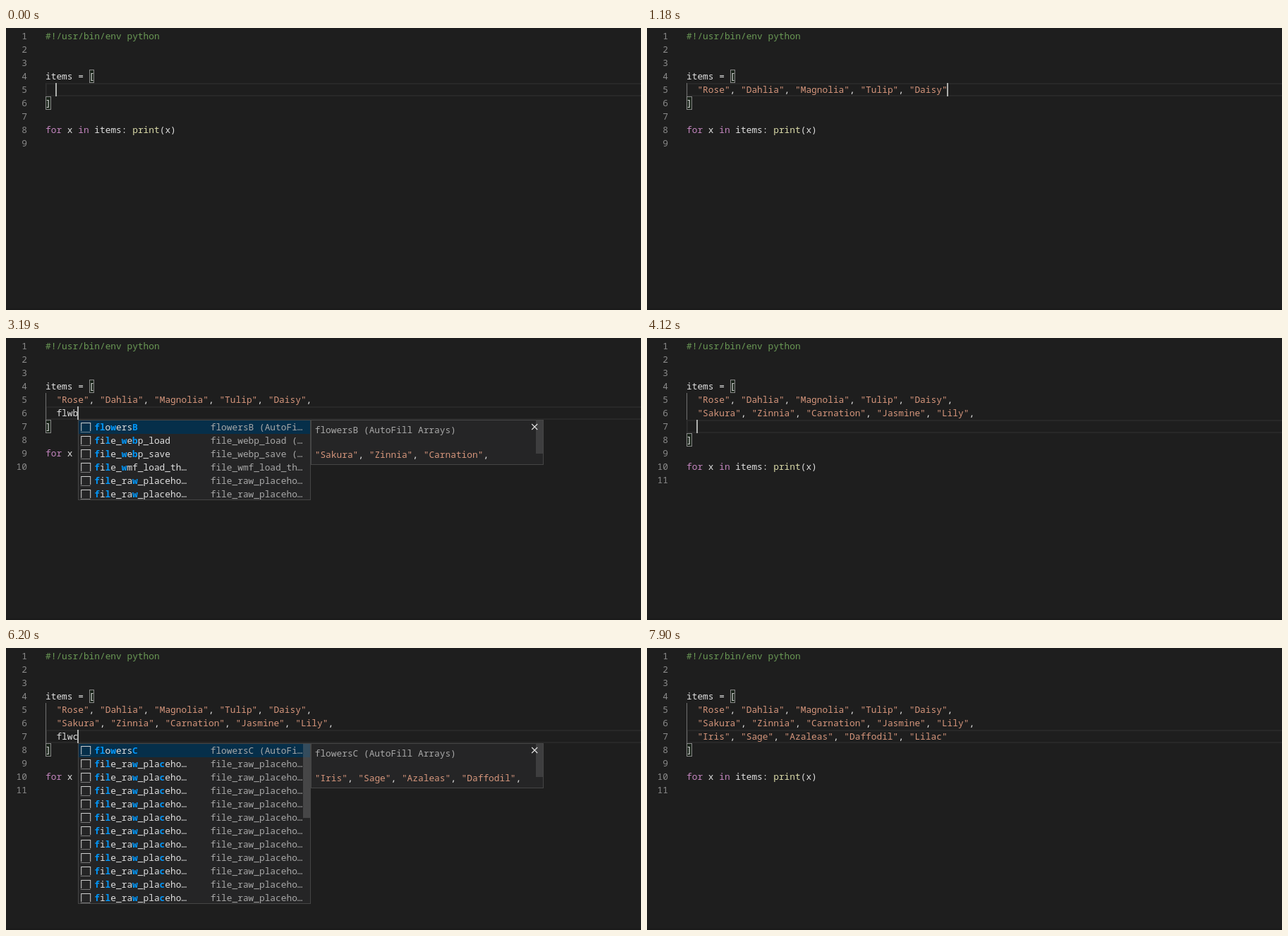
Animation, 900 px wide and 400 px high, one loop 8000 ms. Source, as an HTML page with a canvas:

```html
<!DOCTYPE html>
<html lang="en">
<head>
<meta charset="utf-8">
<title>Snippet completion</title>
<style>
html, body { margin: 0; width: 100%; height: 100%; overflow: hidden; background: #1e1e1e; }
canvas { display: block; width: 900px; height: 400px; }
</style>
</head>
<body>
<canvas id="stage" width="900" height="400"></canvas>
<script>
const ctx = document.getElementById("stage").getContext("2d");
const LOOP = 8000, CH = 7.7, LH = 19, LEFT = 56, TOP = 2;
const WIDTH = 330, MAX_ROWS = 12, MAX_CHARS = 17;
const FONT = '12.83px "Noto Sans Mono", "DejaVu Sans Mono", monospace';
const C = {
  bg: "#1e1e1e", text: "#e0e0e0", num: "#8a8a8a", comment: "#6a9955",
  string: "#d6967c", keyword: "#c586c0", call: "#dcdcaa", panel: "#252526",
  border: "#454545", selected: "#062f4a", match: "#0097fb", dim: "#a8a8a8",
  slider: "rgba(121,121,121,.4)", docSlider: "rgba(121,121,121,.3)",
  line: "#282828", caret: "#aeafad", icon: "#d0d0d0"
};

const quote = words => words.split(" ").map(w => `"${w}"`).join(", ");
const ROWS = [
  "Rose Dahlia Magnolia Tulip Daisy",
  "Sakura Zinnia Carnation Jasmine Lily",
  "Iris Sage Azaleas Daffodil Lilac"
].map(quote);
const DOCS = {
  A: quote("Rose Dahlia Magnolia Tulip") + ",",
  B: quote("Sakura Zinnia Carnation") + ",",
  C: quote("Iris Sage Azaleas Daffodil") + ","
};
const RECENT = "CAB";   // remembered choice on each row

const list = s => s.split(" ");
const flowers = list("flowersA flowersB flowersC flowersD flowersE");
const files = list("file_webp_load file_webp_save file_wmf_load file_wmf_load_thumb " +
  "file_xwd_load file_xwd_save file_raw_get_default file_raw_load file_raw_placeholder");
const holders = n => Array(n).fill("file_raw_placeholder");
const ITEMS = {
  f: [...flowers, ...list("foggify font_map fonts_close_popup fonts_get_list fonts_popup " +
    "fonts_refresh fonts_set_popup free_select fuzzy_select")],
  fl: [...flowers, ...list("file_load file_load_layer file_load_layers file_load_rgbe " +
    "file_load_thumbnail foldr foldr_block file_bmp_load file_bmp_save")],
  flw: [...flowers, ...files],
  flwa: ["flowersA", ...files, ...holders(2)],
  flwb: ["flowersB", files[0], files[1], files[3], ...holders(2)],
  flwc: ["flowersC", ...holders(11)]
};
// scrollbar: offset, step per scrolled row, height
const SLIDER = { f: [123, 1, 20], fl: [2, 7, 20], flw: [1, 5.5, 63], flwa: [1, 0, 105], flwc: [1, 0, 105] };

// time, row, typed text, open list, docs shown, caret hidden
const STEPS = [
  [0, 0, ""],
  [230, 0, "f"], [310, 0, "f", "f", 1], [390, 0, "fl", "f", 1],
  [470, 0, "fl", "fl", 1], [550, 0, "flw", "fl", 1], [630, 0, "flw", "flw", 1],
  [780, 0, "flwa", "flw", 1], [860, 0, "flwa", "flwa", 1],
  [1180, 0, ROWS[0]], [1560, 0, ROWS[0] + ","], [1790, 1, ""],
  [2270, 1, "f"], [2330, 1, "f", "f"], [2400, 1, "f", "f", 1],
  [2480, 1, "fl", "f", 1], [2560, 1, "fl", "fl", 1],
  [2710, 1, "flw", "fl", 1], [2790, 1, "flw", "flw", 1],
  [3110, 1, "flwb", "flw", 1], [3190, 1, "flwb", "flwb", 1],
  [3490, 1, ROWS[1]], [3970, 1, ROWS[1] + ","], [4120, 2, ""],
  [4580, 2, "f"], [4660, 2, "f", "f", 1],
  [4960, 2, "fl", "f", 1], [5050, 2, "fl", "fl", 1],
  [5360, 2, "flw", "fl", 1], [5440, 2, "flw", "flw", 1],
  [5820, 2, "flw", "flw", 1, 1], [6200, 2, "flwc", "flwc", 1],
  [6370, 2, ROWS[2]], [6910, 2, ROWS[2], "", 0, 1],
  [7370, 2, ROWS[2]], [7900, 2, ROWS[2], "", 0, 1]
];

const colX = n => LEFT + n * CH;
const lineY = n => TOP + n * LH;

function rect(x, y, w, h, color) {
  ctx.fillStyle = color;
  ctx.fillRect(x, y, w, h);
}

function frame(x, y, w, h, color) {
  ctx.strokeStyle = color;
  ctx.lineWidth = 1;
  ctx.strokeRect(x + 0.5, y + 0.5, w - 1, h - 1);
}

function text(s, x, y, color, weight = 500) {
  ctx.font = `${weight} ${FONT}`;
  ctx.fillStyle = color;
  ctx.fillText(s, x, y);
}

// draws [text, color] parts one after another
function parts(runs, x, y) {
  for (const [s, color] of runs) {
    text(s, x, y, color);
    x += s.length * CH;
  }
}

const strings = s => s.split(/("[^"]*")/).map(p => [p, p[0] === '"' ? C.string : C.text]);
const cut = s => s.length > MAX_CHARS ? s.slice(0, MAX_CHARS - 1) + "…" : s;

function matches(label, query) {
  const hits = new Set(), low = label.toLowerCase();
  let from = 0;
  for (const c of query) {
    const near = query === "fl" && c === "l" && low.startsWith("file_l");
    const i = near ? 5 : low.indexOf(c, from);
    if (i < 0) break;
    hits.add(i);
    from = i + 1;
  }
  return hits;
}

// open box with a dotted lower edge
function snippetIcon(x, y) {
  rect(x, y, 14, 1, C.icon);
  rect(x, y + 1, 1, 11, C.icon);
  rect(x + 13, y + 1, 1, 11, C.icon);
  for (let i = 0; i < 14; i += 2) rect(x + i, y + 13, 1, 1, C.icon);
}

function wrenchIcon(x, y) {
  ctx.strokeStyle = C.icon;
  ctx.lineWidth = 1.2;
  ctx.beginPath();
  ctx.arc(x + 9, y + 4.5, 3.6, -0.15, Math.PI * 1.55);
  ctx.lineTo(x + 8.3, y + 3.8);
  ctx.lineTo(x + 9.8, y + 5.2);
  ctx.closePath();
  ctx.moveTo(x + 5.6, y + 6);
  ctx.lineTo(x + 0.8, y + 10.8);
  ctx.lineTo(x + 2.6, y + 12.6);
  ctx.lineTo(x + 7.6, y + 7.8);
  ctx.stroke();
}

function clipped(x, y, w, h, draw) {
  ctx.save();
  ctx.beginPath();
  ctx.rect(x, y, w, h);
  ctx.clip();
  rect(x, y, w, h, C.panel);
  draw();
  frame(x, y, w, h, C.border);
  ctx.restore();
}

function popup(row, query, docs) {
  const exact = colX(2 + query.length), x = Math.round(exact - 0.05), y = lineY(5 + row);
  const start = query.length < 4 ? "ABC".indexOf(RECENT[row]) : 0;
  const items = ITEMS[query].slice(start, start + MAX_ROWS);
  const h = items.length * LH;

  clipped(x, y, WIDTH, h, () => {
    rect(x, y + 1, WIDTH, LH, C.selected);
    items.forEach((label, i) => {
      const top = y + 1 + i * LH, base = top + 14, tool = label.startsWith("foldr");
      const hits = matches(label, query);
      (tool ? wrenchIcon : snippetIcon)(exact + 4, top + 3);
      [...cut(label)].forEach((c, k) => {
        const hit = hits.has(k) && c !== "…";
        text(c, exact + 23 + k * CH, base, hit ? C.match : C.text, hit ? 700 : 500);
      });
      const origin = label.startsWith("flowers") ? " (AutoFill Arrays)" : " (GIMP Python)";
      if (!tool) text(cut(label + origin), exact + 187.5, base, C.dim);
    });
    const bar = SLIDER[query];
    if (bar) rect(x + WIDTH - 11, y + bar[0] + bar[1] * start, 10, bar[2], C.slider);
  });
  if (docs) docsPanel(x + WIDTH, y, exact + WIDTH, items[0]);
}

function docsPanel(x, y, exact, name) {
  clipped(x, y, WIDTH, 64, () => {
    text(name + " (AutoFill Arrays)", exact + 5.5, y + 19, C.dim);
    parts(strings(DOCS[name.slice(-1)]), exact + 5.5, y + 54);
    rect(x + WIDTH - 11, y + 1, 10, 47, C.docSlider);
    ctx.strokeStyle = C.text;
    ctx.lineWidth = 1.2;
    ctx.beginPath();
    for (const d of [-4, 4]) {
      ctx.moveTo(exact + 317 - d, y + 6);
      ctx.lineTo(exact + 317 + d, y + 14);
    }
    ctx.stroke();
  });
}

function bracket(c, col, line) {
  const x = Math.round(colX(col)), y = lineY(line);
  const w = Math.round(colX(col + 1)) - x;
  rect(x, y, w, LH, "rgba(0,100,0,.1)");
  frame(x, y, w, LH, "#888888");
  text(c, colX(col), y + 14, C.text);
}

function draw(t) {
  const [, row, typed, query, docs, hidden] = STEPS.findLast(s => s[0] <= t);
  const y = n => lineY(n) + 14, here = lineY(4 + row);

  rect(0, 0, 900, 400, C.bg);
  rect(0, 398, 900, 2, "#1a1a1a");
  frame(LEFT, here, 850, LH, C.line);
  frame(LEFT + 1, here + 1, 850, LH - 2, C.line);

  for (let i = 1; i <= 9 + row; i++) {
    text(String(i), 30 - String(i).length * CH, y(i - 1), C.num);
  }
  for (let i = 0; i <= row; i++) {
    const blank = i === row && !typed;
    rect(LEFT, lineY(4 + i), 1, LH, blank ? "#303030" : "#707070");
    const s = i < row ? ROWS[i] + "," : typed;
    parts(strings(s), colX(2), y(4 + i));
  }

  text("#!/usr/bin/env python", LEFT, y(0), C.comment);
  text("items = ", LEFT, y(3), C.text);
  bracket("[", 8, 3);
  bracket("]", 0, 5 + row);
  parts([["for", C.keyword], [" x ", C.text], ["in", C.keyword], [" items: ", C.text],
    ["print", C.call], ["(x)", C.text]], LEFT, y(7 + row));

  if (query) popup(row, query, docs);
  if (!hidden) rect(Math.round(colX(2 + typed.length) - 1.05), here, 2, LH, C.caret);
}

const begin = performance.now();
function tick() {
  draw((performance.now() - begin) % LOOP);
  requestAnimationFrame(tick);
}
tick();
</script>
</body>
</html>
```
